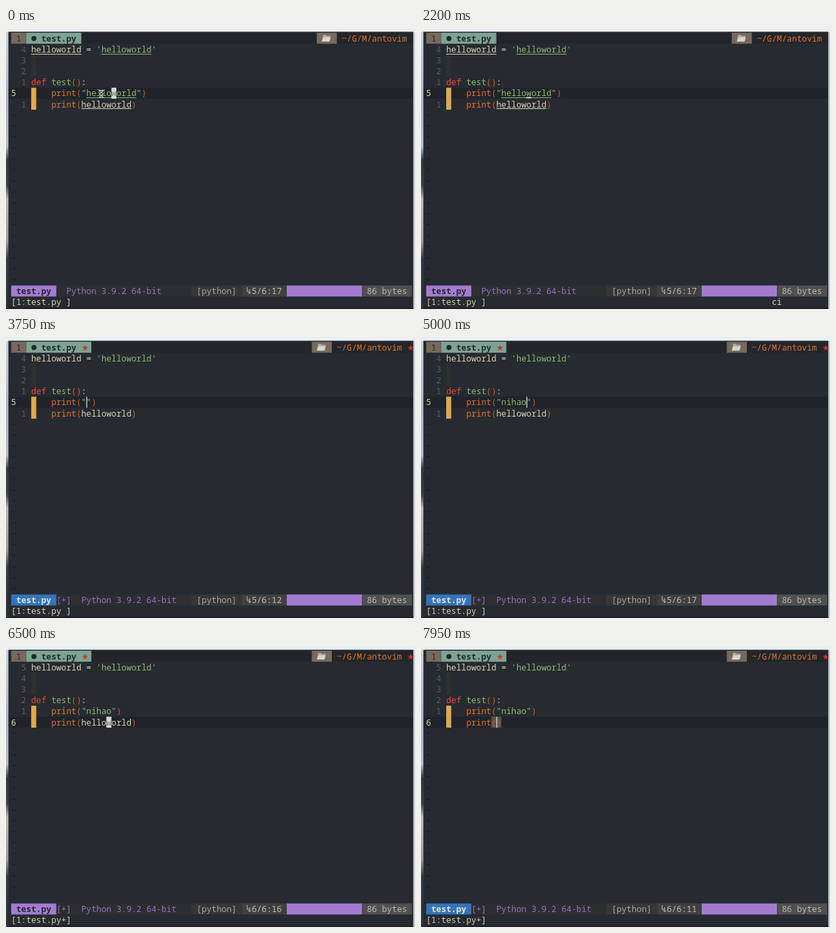
An HTML page for the animation above (8 s loop, 600 px wide and 413 px high).

```html
<!DOCTYPE html>
<html lang="en">
<head>
<meta charset="utf-8">
<title>Editing test.py</title>
<style>
  html, body { margin: 0; width: 100%; height: 100%; overflow: hidden; background: #262b31; }
  svg { display: block; }
  text { font: 12.25px "Noto Sans Mono", "Liberation Mono", monospace; white-space: pre; }
  .bold { font-weight: 700; }
</style>
</head>
<body>
<svg width="600" height="413" viewBox="0 0 600 413">
  <defs>
    <linearGradient id="left" x2="0" y2="1">
      <stop offset="0" stop-color="#c9d6de"/>
      <stop offset=".25" stop-color="#a9b9c6"/>
      <stop offset=".42" stop-color="#b4c0ca"/>
      <stop offset=".47" stop-color="#343b44"/>
      <stop offset=".56" stop-color="#3f444b"/>
      <stop offset=".61" stop-color="#c3b8b2"/>
      <stop offset=".76" stop-color="#a89c96"/>
      <stop offset=".82" stop-color="#353e4a"/>
      <stop offset="1" stop-color="#2b333d"/>
    </linearGradient>
  </defs>
  <rect width="600" height="413" fill="#c6ccd1"/>
  <rect width="300" height="413" fill="url(#left)"/>
  <rect width="600" height="6" fill="#eaf0f1"/>
  <rect x="3.5" y="5.5" width="594" height="408" fill="#262b31"/>
  <rect x="3.5" y="411.5" width="594" height="2" fill="#171b20"/>
  <g id="screen"></g>
</svg>
<script>
const CELL = 7.35, LINE = 16.15, LEFT = 7.6, TOP = 7, LOOP = 8000;
const C = {
  fg: '#ddd2b0', red: '#ee4b36', green: '#8fb86f', orange: '#e57328', paren: '#c9602a',
  dim: '#5d5b58', dark: '#23282d', tab: '#7da393', brown: '#77695c', gold: '#dfa94b',
  purple: '#a57bd2', blue: '#3274bd', light: '#d9d9d6'
};
const x = col => LEFT + col * CELL;
const y = row => TOP + row * LINE;

const rect = (left, top, w, h, fill) =>
  `<rect x="${left}" y="${top}" width="${w}" height="${h}" fill="${fill}"/>`;
const block = (col, row, cells, fill) => rect(x(col), y(row), cells * CELL, LINE, fill);
const text = (col, row, str, fill, bold) =>
  `<text x="${x(col)}" y="${y(row) + 12.6}" fill="${fill}"${bold ? ' class="bold"' : ''}>${str}</text>`;
const underline = (col, row, cells, fill) =>
  rect(x(col), Math.round(y(row) + 14.6), cells * CELL, 1, fill);
const path = (d, stroke, width) =>
  `<path d="${d}" fill="none" stroke="${stroke}" stroke-width="${width}"/>`;

// Lays out [string, colour] pairs one after another.
function run(col, row, parts) {
  return parts.map(([str, fill]) => {
    const out = text(col, row, str, fill);
    col += str.length;
    return out;
  }).join('');
}

// Key presses: each entry changes part of the state from its time on.
const keys = [
  [0, { word: 'helloworld', arg: 'helloworld', row: 5, pos: 17, cursor: 'block', marks: true,
        mouse: true, pending: '', insert: false, changed: false, listed: false }],
  [1750, { mouse: false, pending: 'c', cursor: 'under' }],
  [2000, { pending: 'ci' }],
  [2800, { pending: '', word: '', pos: 12, cursor: 'bar', insert: true, changed: true, marks: false }],
  ...[...'nihao'].map((_, i) => [4000 + i * 160, { word: 'nihao'.slice(0, i + 1), pos: 13 + i }]),
  [5500, { pos: 16, cursor: 'block', insert: false, listed: true }],
  [6200, { row: 6 }],
  [6950, { pending: 'c', cursor: 'under' }],
  [7150, { pending: 'ci' }],
  [7700, { pending: '', arg: '', pos: 11, cursor: 'bar', insert: true }]
];
const states = [];
for (const [at, change] of keys) states.push({ ...states.at(-1), ...change, at });

function folderIcon(left, top) {
  return `<path d="M${left + 2} ${top}h4l1 1.5h6l-1 8h-12z" fill="#a9a9a5"/>` +
    `<path d="M${left + 2.5} ${top + 3.5}h10.5l-2 6.5h-11z" fill="#d3d5d2"/>`;
}

function tabLine(s) {
  const folder = s.changed ? 60 : 61;
  return block(0, 0, 3, C.brown) + text(1, 0, '1', C.dark) +
    block(3, 0, s.changed ? 13 : 11, C.tab) +
    `<circle cx="41" cy="15.5" r="3.7" fill="${C.dark}"/>` +
    text(6, 0, 'test.py', C.dark, true) +
    (s.changed ? text(14, 0, '★', '#cf3328') + text(79, 0, '★', '#cf3328') : '') +
    block(folder, 0, 4, C.brown) + folderIcon(x(folder + 1), y(0) + 3) +
    text(folder + 5, 0, '~/G/M/antovim', C.orange);
}

function buffer(s) {
  let out = rect(4, y(s.row), 593, LINE, '#1f242a');
  for (let row = 1; row <= 6; row++) {
    out += row === s.row ? text(0, row, row, '#e6d3a0') : text(2, row, Math.abs(row - s.row), C.dim);
  }
  for (let row = 7; row <= 22; row++) out += text(0, row, '~', '#171b20');
  out += rect(x(4), y(2), CELL, 2 * LINE, '#302e2f') + rect(x(4), y(5), CELL, 2 * LINE, C.gold);
  if (s.row === 6 && s.insert) out += block(13, 6, 2, '#5c5149');
  out += run(4, 1, [['helloworld', C.fg], [' = ', C.fg], ["'helloworld'", C.green]]) +
    run(4, 4, [['def ', C.red], ['test', C.green], ['()', C.paren], [':', C.fg]]) +
    run(8, 5, [['print', C.orange], ['(', C.paren], [`"${s.word}"`, C.green], [')', C.paren]]) +
    run(8, 6, [['print', C.orange], ['(', C.paren], [s.arg, C.fg], [')', C.paren]]);
  if (s.marks) {
    out += underline(4, 1, 10, C.fg) + underline(18, 1, 10, C.green) +
      underline(15, 5, 10, C.green) + underline(14, 6, 10, C.fg);
  }
  return out;
}

function cursor(s) {
  const col = s.pos + 3, left = x(col), top = y(s.row);
  if (s.cursor === 'bar') return rect(left, top, 1.3, LINE, C.light);
  if (s.cursor === 'under') return rect(left, top + 13.6, CELL, 2, C.light);
  return block(col, s.row, 1, C.light) + text(col, s.row, 'w', '#77797a');
}

function mouse() {
  const shape = 'M136 91.5h7.5M136 102.5h7.5M137 92l5.5 5-5.5 5M142.5 92l-5.5 5 5.5 5';
  return path(shape, '#1b1e22', 2.6) + path(shape, '#d5d8d6', 1.1);
}

function statusLine(s) {
  return block(0, 23, 80, '#2c2e31') +
    block(0, 23, 9, s.insert ? C.blue : C.purple) +
    text(1, 23, 'test.py', s.insert ? '#e4e4dc' : C.dark, true) +
    (s.changed ? text(9, 23, '[+]', '#9872c2') : '') +
    text(s.changed ? 14 : 11, 23, 'Python 3.9.2 64-bit', '#9872c2') +
    block(36, 23, 10, '#363636') + text(37, 23, '[python]', '#aaa79e') +
    block(46, 23, 9, '#404040') +
    path('M353.8 381v6h2.7M357.3 384v6.5M355.3 388.5l2 2.2 2-2.2', '#c4c1b7', 1) +
    text(48, 23, `${s.row}/6:${s.pos}`, '#c4c1b7') +
    block(55, 23, 15, C.purple) +
    block(70, 23, 10, '#505050') + text(71, 23, '86 bytes', '#bdbab1');
}

const screen = document.getElementById('screen');
function draw(s) {
  screen.innerHTML = rect(4, y(0), 593, LINE, '#22262b') + tabLine(s) + buffer(s) + cursor(s) +
    (s.mouse ? mouse() : '') + statusLine(s) +
    text(0, 24, `[1:test.py${s.listed ? '+' : ' '}]`, C.fg) + text(69, 24, s.pending, C.fg);
}

let shown;
const start = performance.now();
function tick() {
  const t = (performance.now() - start) % LOOP;
  const state = states.findLast(s => s.at <= t);
  if (state !== shown) draw(shown = state);
  requestAnimationFrame(tick);
}
tick();
</script>
</body>
</html>
```
